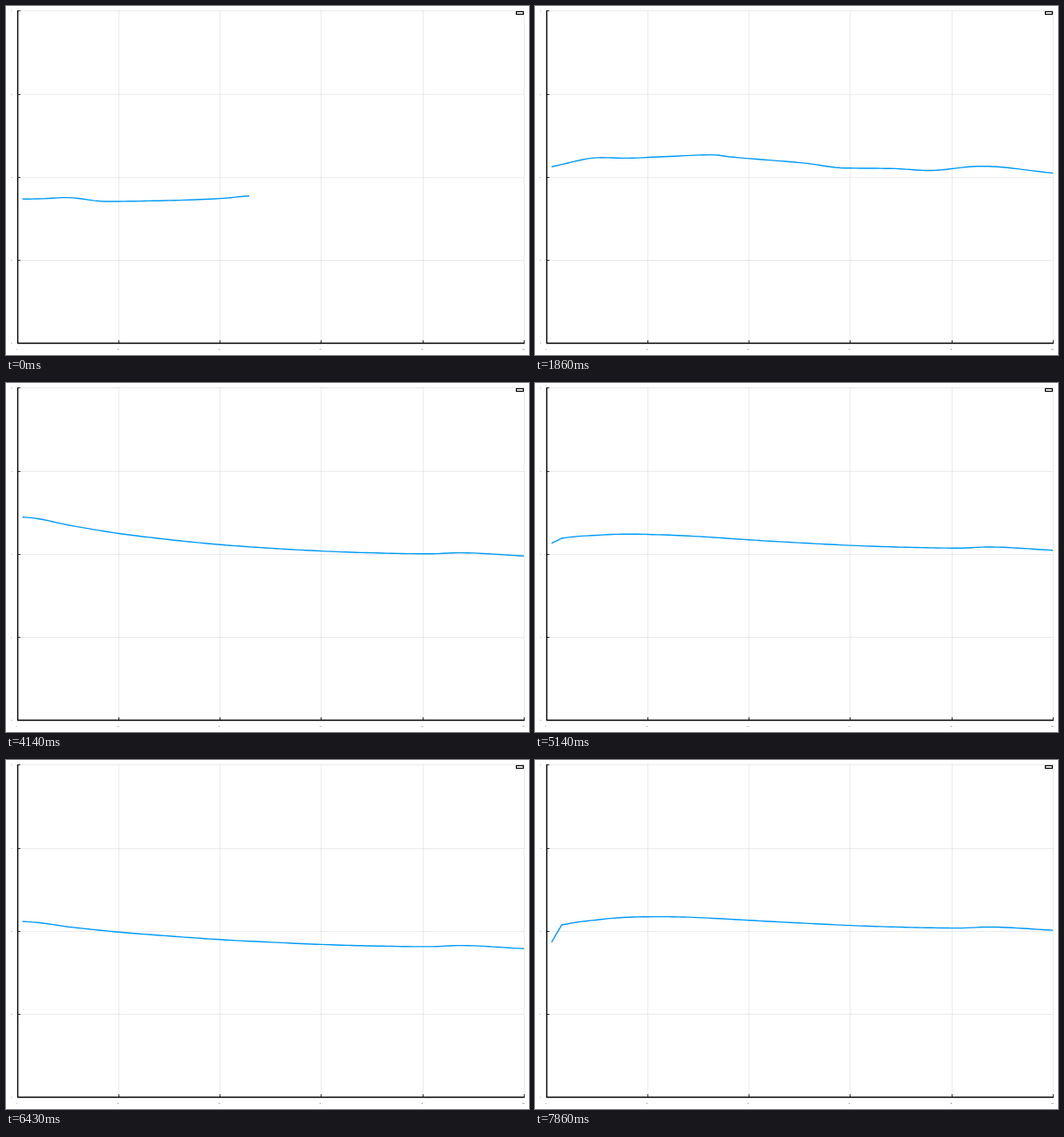
Write an HTML page that moves like this. It is 600x400 px and loops after 8 s.

```html
<!DOCTYPE html>
<html lang="en">
<head>
<meta charset="utf-8">
<title>Line plot</title>
<style>
  html, body { margin: 0; width: 100%; height: 100%; overflow: hidden; background: #fff; }
  svg { display: block; width: 600px; height: 400px; }
  text { font: 1.5px "Liberation Sans", sans-serif; fill: #000; }
</style>
</head>
<body>
<svg viewBox="0 0 600 400">
  <defs><clipPath id="area"><rect x="13" y="5" width="581.5" height="381.5"/></clipPath></defs>
  <path id="grid" fill="none" stroke="#000" stroke-opacity=".08"/>
  <path id="ticks" fill="none" stroke="#000" stroke-width=".8"/>
  <path d="M13.5 5V386.5H595" fill="none" stroke="#000" stroke-width="1.4"/>
  <g id="labels"></g>
  <path id="line" clip-path="url(#area)" fill="none" stroke="#009af9" stroke-width="1.4" stroke-linejoin="round"/>
  <rect x="585.5" y="6.5" width="8" height="3" fill="#fff" stroke="#000" stroke-width="1.2"/>
</svg>
<script>
const LOOP = 8000, STEPS = 56, RIGHT = 594.3, FLOOR = 386, SAMPLE = 5.81;
const $ = id => document.getElementById(id);
const mix = (a, b, k) => a + (b - a) * k;

// Smooth monotone curve through a few points given as "x,y x,y ..."
function curve(text) {
  const pts = text.split(" ").map(p => p.split(",").map(Number));
  const last = pts.length - 1;
  const slope = i => (pts[i + 1][1] - pts[i][1]) / (pts[i + 1][0] - pts[i][0]);
  const tangent = i => {
    if (i === 0) return slope(0);
    if (i === last) return slope(last - 1);
    const a = slope(i - 1), b = slope(i);
    return a * b > 0 ? 2 * a * b / (a + b) : 0;
  };
  return x => {
    let i = 0;
    while (i < last - 1 && x > pts[i + 1][0]) i++;
    const w = pts[i + 1][0] - pts[i][0], u = (x - pts[i][0]) / w, v = 1 - u;
    return pts[i][1] * v * v * (1 + 2 * u) + pts[i + 1][1] * u * u * (3 - 2 * u)
      + w * u * v * (tangent(i) * v - tangent(i + 1) * u);
  };
}

const early = curve("19,221.3 40,220.9 70,219.6 115,224 175,223.2 245,220.7 279,217.7 594,202");
const wavy = curve("19,184.2 75,173.8 105,174.4 145,172.8 205,170.6 222,172.7 310,180.2 355,185.7 410,186.3 452,188.5 512,183.6 594,191.5");
const rising = curve("22,199 38,207 65,208.9 120,205.8 157,202 175,203.1 240,196 345,185.2 374,185 480,173.8 594,162.5");
const settled = curve("19,153.8 30,154.6 75,163.5 150,175.2 275,187.5 410,194.4 487,195.8 520,194.6 594,198.3");

// The settled curve, moved down by shift, plus a transient fading over a length
const relaxed = (shift, amp, length) => x =>
  settled(x) + shift + amp * Math.exp(-((Math.max(0, x - 30) / length) ** 1.15));

// start: first x; kick: extra drop of the first sample
const poses = [
  { at: 0, start: 19, kick: 0, f: early },
  { at: 13, start: 19, kick: 0, f: wavy },
  { at: 21, start: 22, kick: 0, f: rising },
  { at: 29, start: 19, kick: 0, f: settled },
  { at: 36, start: 19, kick: 6.5, f: relaxed(-6.6, 30, 76) },
  { at: 45, start: 19, kick: 0, f: relaxed(17.8, 13.4, 145) },
  { at: 55, start: 19, kick: 20.5, f: relaxed(-3.2, 37.7, 80) }
];

function draw(step) {
  const i = Math.max(1, poses.findIndex(p => p.at >= step));
  const a = poses[i - 1], b = poses[i], k = (step - a.at) / (b.at - a.at);
  const y = x => mix(a.f(x), b.f(x), k);
  const start = mix(a.start, b.start, k);
  const end = Math.min(RIGHT, 279 + 39.5 * step);
  // Every ninth step the first sample falls to the floor
  const kick = step % 9 === 5 ? FLOOR - y(start) : mix(a.kick, b.kick, k);
  const point = x => {
    const fade = Math.max(0, 1 - (x - start) / (2 * SAMPLE));
    return x.toFixed(2) + " " + (y(x) + kick * fade).toFixed(2);
  };
  let d = "M";
  for (let x = start; x < end; x += SAMPLE) d += point(x) + "L";
  $("line").setAttribute("d", d + point(end));
}

function buildAxes() {
  let grid = "", ticks = "", labels = "";
  for (let i = 0; i <= 5; i++) {
    const x = Math.floor(13 + i * 116.25) + 0.5;
    if (i) grid += `M${x} 5V386`;
    ticks += `M${x} 386v-3`;
    labels += `<text x="${x - 1}" y="394" text-anchor="middle">${i * 20}</text>`;
  }
  for (let i = 0; i <= 4; i++) {
    const y = Math.round(5.4 + i * 95.25) + 0.5;
    if (i < 4) grid += `M13 ${y}H594`;
    ticks += `M13 ${y}h3.5`;
    labels += `<text x="7" y="${y + 0.8}" text-anchor="end">${String(2 - i).replace("-", "−")}</text>`;
  }
  $("grid").setAttribute("d", grid);
  $("ticks").setAttribute("d", ticks);
  $("labels").innerHTML = labels;
}

function tick() {
  const t = performance.now() % LOOP;
  draw(Math.min(STEPS - 1, Math.floor((t + 4) * STEPS / LOOP)));
  requestAnimationFrame(tick);
}

buildAxes();
tick();
</script>
</body>
</html>
```
